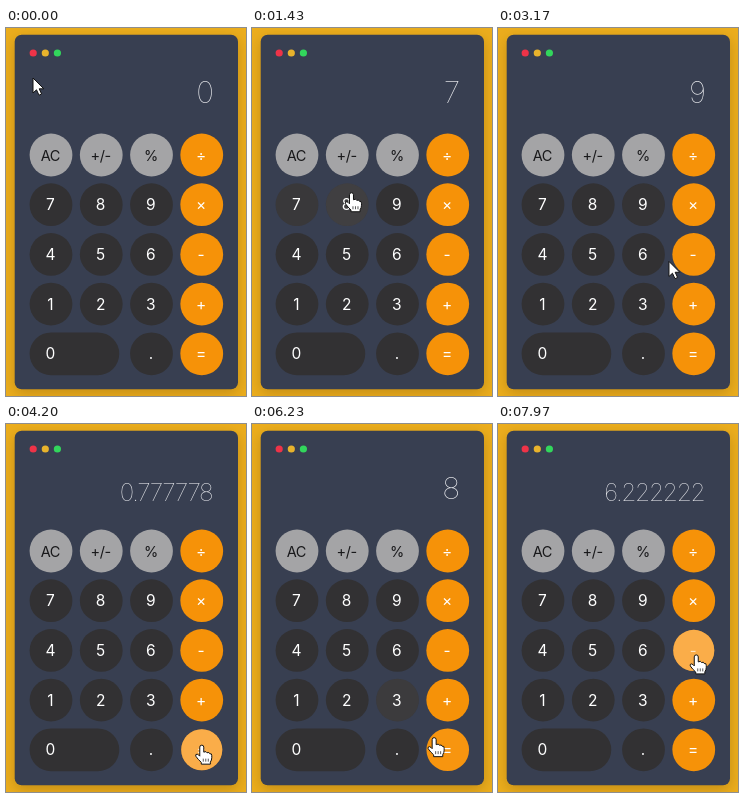
An HTML page for the animation above (8 s loop, 240 px wide and 368 px high).

```html
<!DOCTYPE html>
<html lang="en">
<head>
<meta charset="utf-8">
<title>Calculator</title>
<style>
  html, body { margin: 0; width: 100%; height: 100%; overflow: hidden; background: #ecae1d; }
  svg { display: block; width: 240px; height: 368px; font-family: Inter, Roboto, sans-serif; cursor: default; }
  .panel { fill: #383f51; filter: drop-shadow(0 4px 7px rgba(70, 40, 0, .25)); }
  .dark { fill: #323133; }
  .gray { fill: #a4a4a6; }
  .orange { fill: #f69208; }
  .glow { fill: #fff; opacity: 0; }
  .orange + .glow, .on-orange + .glow { fill: #ffc98a; }
  .key { fill: #fff; font-size: 15.5px; text-anchor: middle; }
  .on-gray { fill: #19191b; font-size: 14.5px; letter-spacing: -.4px; }
  #display { fill: #f0f1f4; font-weight: 100; letter-spacing: -.055em; text-anchor: end; }
  #cursor path { fill: #fff; stroke: #111; stroke-width: 1; stroke-linejoin: round; }
</style>
</head>
<body>
<svg viewBox="0 0 240 368">
  <rect class="panel" x="8.7" y="6.8" width="223.3" height="354.4" rx="7"/>
  <g id="lights"></g>
  <text id="display" x="206.4"></text>
  <g id="keys"></g>
  <g id="cursor">
    <path id="arrow" d="M0 0V15L3.5 11.8L6 17.2L8.6 16L6.2 10.8H10.8Z"/>
    <g id="hand">
      <path d="M-2 2Q-2 0 0 0T2 2V7Q4.6 5.6 5.2 7.6Q7.6 6.6 8 8.6Q10.2 8 10 10.5V12.5Q10 15 8.6 17V19H-.5V17.2Q-3.6 14.5-6 11Q-6.6 9-4.6 9Q-3 9.6-2 11Z"/>
      <path d="M1.5 13.5V16.5M4 13.5V16.5M6.5 13.5V16.5" style="stroke-width:.7"/>
    </g>
  </g>
</svg>
<script>
const LOOP = 8000, FADE = 200, SAMPLES = 20;
const LEFT = 45, TOP = 127, COLUMN = 50.25, ROW = 49.7, RADIUS = 21.4;
const $ = id => document.getElementById(id);

function add(parent, tag, attributes) {
  const node = document.createElementNS('http://www.w3.org/2000/svg', tag);
  for (const name in attributes) node.setAttribute(name, attributes[name]);
  return parent.appendChild(node);
}

['#ee3348', '#e8b32c', '#32d65c'].forEach((fill, i) =>
  add($('lights'), 'circle', { cx: 27.2 + 12.1 * i, cy: 25, r: 3.6, fill }));

const keys = {};
['AC +/- % ÷', '7 8 9 ×', '4 5 6 -', '1 2 3 +', '0 0 . ='].forEach((line, row) =>
  line.split(' ').forEach((label, column) => {
    if (keys[label]) keys[label].extra = COLUMN - 3.4;
    else keys[label] = {
      x: LEFT + COLUMN * column, y: TOP + ROW * row, extra: 0,
      kind: column === 3 ? 'orange' : row === 0 ? 'gray' : 'dark'
    };
  }));

for (const [label, key] of Object.entries(keys)) {
  const { x, y, extra, kind } = key;
  const box = { x: x - RADIUS, y: y - RADIUS, width: 2 * RADIUS + extra, height: 2 * RADIUS, rx: RADIUS };
  key.group = add($('keys'), 'g', {});
  add(key.group, 'rect', { ...box, class: kind });
  add(key.group, 'text', { x: x - .6, y: y + 5.5, class: `key on-${kind}` }).textContent = label;
  key.glow = add(key.group, 'rect', { ...box, class: 'glow' });
}

// The pointer rests on each key between two times, a little off its centre
function visit(label, arrive, leave, dx, dy) {
  const { x, y } = keys[label];
  return { label, arrive, leave, x: x + dx, y: y + dy };
}
const visits = [
  { x: 27, y: 50, arrive: 0, leave: 0 },
  visit('7', 680, 1100, 0, 8),
  visit('÷', 1950, 2150, 11, -1.5),
  visit('9', 2600, 2850, 11, 4),
  visit('=', 3630, 4150, 0, -2),
  visit('×', 4800, 5030, 1, -4),
  visit('8', 5370, 5680, 3, 0),
  visit('=', 6330, 7250, -8, -3),
  visit('-', 7900, LOOP, 2.5, 4.5)
];

// Work out what the display reads after each press
const operations = { '÷': (a, b) => a / b, '×': (a, b) => a * b };
const readings = [{ time: 0, value: 0 }];
let stored = 0, operator = null;
for (const { label, arrive, leave } of visits.slice(1)) {
  let value = readings.at(-1).value;
  if (label === '=') value = operations[operator](stored, value);
  else if (isNaN(label)) [stored, operator] = [value, label];
  else value = Number(label);
  readings.push({ time: arrive + .8 * (leave - arrive), value });
}

function pointerAt(time) {
  const t = Math.max(time, 0);
  const i = visits.findLastIndex(stop => stop.arrive <= t);
  const from = visits[i], to = visits[i + 1];
  if (!to || t <= from.leave) return from;
  const u = (t - from.leave) / (to.arrive - from.leave);
  const ease = u * u * (3 - 2 * u);
  return { x: from.x + (to.x - from.x) * ease, y: from.y + (to.y - from.y) * ease };
}

function isOver(key, { x, y }) {
  const nearest = Math.min(Math.max(x, key.x), key.x + key.extra);
  return Math.hypot(x - nearest, y - key.y) < RADIUS;
}

function draw(t) {
  const pointer = pointerAt(t);
  const trail = Array.from({ length: SAMPLES }, (_, i) => pointerAt(t - i * FADE / SAMPLES));
  for (const key of Object.values(keys)) {
    const hover = trail.filter(point => isOver(key, point)).length / SAMPLES;
    const orange = key.kind === 'orange';
    key.glow.style.opacity = hover * (orange ? .5 : .12);
    const scale = orange ? 1 - .04 * hover : 1;
    key.group.setAttribute('transform',
      `translate(${key.x} ${key.y}) scale(${scale}) translate(${-key.x} ${-key.y})`);
  }
  const pointing = Object.values(keys).some(key => isOver(key, pointer));
  $('hand').style.display = pointing ? '' : 'none';
  $('arrow').style.display = pointing ? 'none' : '';
  $('cursor').setAttribute('transform', `translate(${pointer.x} ${pointer.y})`);

  const { value } = readings.findLast(({ time }) => time <= t);
  const text = String(Number(value.toFixed(6)));
  const long = text.length > 1;
  $('display').textContent = text;
  $('display').setAttribute('y', long ? 76.5 : 75);
  $('display').style.fontSize = long ? '24.5px' : '30px';
}

const began = performance.now();
function tick() {
  draw((performance.now() - began) % LOOP);
  requestAnimationFrame(tick);
}
tick();
</script>
</body>
</html>
```
